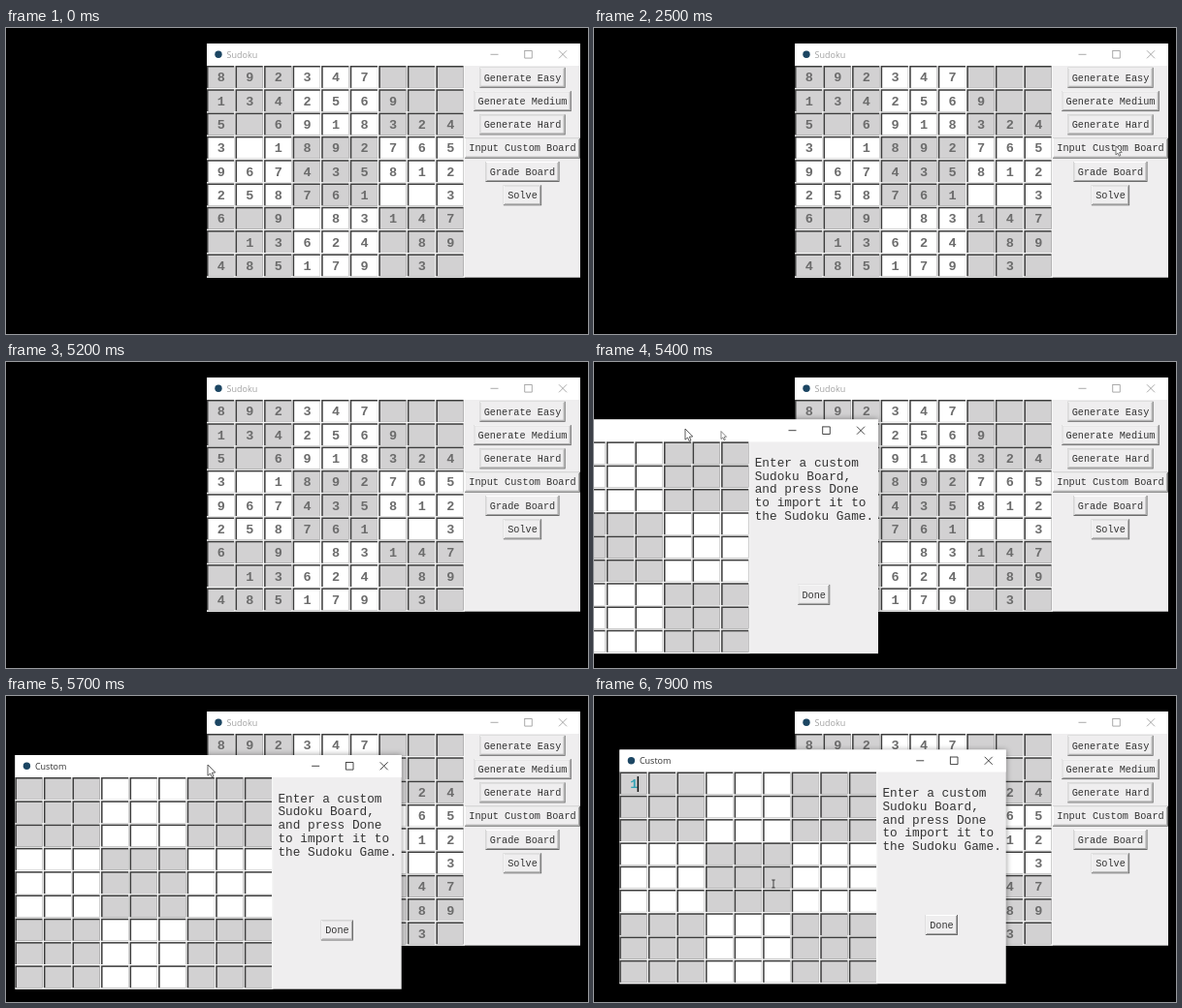
An HTML page with a canvas that plays this animation: 600 px wide and 316 px high, repeating every 8 s.

```html
<!DOCTYPE html>
<html lang="en">
<head>
<meta charset="utf-8">
<title>Sudoku</title>
<style>
  html, body { margin: 0; width: 100%; height: 100%; overflow: hidden; background: #000; }
  canvas { display: block; }
</style>
</head>
<body>
<canvas id="stage" width="600" height="316"></canvas>
<script>
const ctx = document.getElementById('stage').getContext('2d');
const LOOP = 8000, STEP = 100;
const MONO = '"Liberation Mono", monospace';
const SANS = '"Open Sans", sans-serif';
const INK = '#333';
const TITLE_H = 23, GRID_W = 266, GRID_H = 218.7;
const CELL_W = GRID_W / 9, CELL_H = GRID_H / 9;
const WINDOW_H = TITLE_H + GRID_H;
const MAIN = { x: 207, y: 16, w: 385 };
const CUSTOM_W = 398.3;

const BOARD = [
  '892347   ', '1342569  ', '5 6918324',
  '3 1892765', '967435812', '258761  3',
  '6 9 83147', ' 13624 89', '485179 3 ',
];
const BUTTONS = ['Generate Easy', 'Generate Medium', 'Generate Hard',
  'Input Custom Board', 'Grade Board', 'Solve'];
const HINT = ['Enter a custom', 'Sudoku Board,', 'and press Done',
  'to import it to', 'the Sudoku Game.'];

// Key points: [time, x, y]
const APPROACH = [[100, 224, 240], [900, 541, 50], [1400, 517, 120], [1800, 578, 190],
  [2100, 578, 188], [2500, 538, 122], [2900, 538, 122], [3400, 251, 238],
  [4100, 251, 238], [4700, 202, 140]];
const DRAG = [[5400, 94, 69], [5700, 208, 71], [5900, 225, 65.5], [6000, 225, 65.5],
  [6200, 173.5, 79], [6600, 20, 101], [6900, 41, 95], [7300, 41, 95], [7800, 185, 194]];
const CUSTOM_PATH = [[5400, -105.3, 59.4], [5700, 9.4, 61], [5900, 26.4, 55.5]];

function along(path, t) {
  if (t <= path[0][0]) return path[0].slice(1);
  for (let i = 1; i < path.length; i++) {
    const [t0, x0, y0] = path[i - 1], [t1, x1, y1] = path[i];
    if (t <= t1) {
      const k = (t - t0) / (t1 - t0);
      return [x0 + (x1 - x0) * k, y0 + (y1 - y0) * k];
    }
  }
  return path[path.length - 1].slice(1);
}

function rect(x, y, w, h, color) {
  ctx.fillStyle = color;
  ctx.fillRect(x, y, w, h);
}

function text(str, x, y, font, color, align = 'left') {
  ctx.font = font;
  ctx.fillStyle = color;
  ctx.textAlign = align;
  ctx.fillText(str, x, y);
}

function lines(color, width, ...paths) {
  ctx.strokeStyle = color;
  ctx.lineWidth = width;
  ctx.beginPath();
  for (const p of paths) {
    ctx.moveTo(p[0], p[1]);
    for (let i = 2; i < p.length; i += 2) ctx.lineTo(p[i], p[i + 1]);
  }
  ctx.stroke();
}

function windowFrame(x, y, w, title, active) {
  ctx.shadowColor = 'rgba(0,0,0,.4)';
  ctx.shadowBlur = 6;
  rect(x, y, w, WINDOW_H, '#efeeef');
  ctx.shadowColor = 'transparent';
  rect(x, y, w, TITLE_H, '#fff');
  const mid = y + 11.3, right = x + w;
  ctx.fillStyle = '#1c4663';
  ctx.beginPath();
  ctx.arc(x + 12, mid, 3.7, 0, Math.PI * 2);
  ctx.fill();
  const color = active ? INK : '#a2a2a2';
  text(title, x + 20.5, y + 14.8, '9px ' + SANS, color);
  lines(color, 0.9,
    [right - 92.5, mid, right - 84.5, mid],
    [right - 57.3, mid - 3.8, right - 49.7, mid - 3.8, right - 49.7, mid + 3.8,
      right - 57.3, mid + 3.8, right - 57.3, mid - 4.2],
    [right - 22, mid - 4, right - 14, mid + 4],
    [right - 14, mid - 4, right - 22, mid + 4]);
}

function grid(x, y, digitAt, color) {
  for (let r = 0; r < 9; r++) for (let c = 0; c < 9; c++) {
    const cx = x + c * CELL_W, cy = y + r * CELL_H;
    const shaded = (Math.floor(r / 3) + Math.floor(c / 3)) % 2 === 0;
    rect(cx, cy, CELL_W, CELL_H, '#f6f6f6');
    rect(cx, cy, CELL_W - 1.4, CELL_H - 1.4, '#3c3c3c');
    rect(cx + 1.5, cy + 1.5, CELL_W - 2.9, CELL_H - 2.9, shaded ? '#d2d1d2' : '#fff');
    text(digitAt(r, c), cx + 14.8, cy + 16.4, 'bold 13.5px ' + MONO, color, 'center');
  }
}

function button(label, cx, cy, pressed) {
  const w = label.length * 6.13 + 8.6, h = 21, x = cx - w / 2, y = cy - h / 2;
  const [light, dark] = pressed ? ['#6b6b6b', '#fff'] : ['#fff', '#6b6b6b'];
  rect(x, y, w, h, dark);
  rect(x, y, w - 1, h - 1, light);
  rect(x + 1, y + 1, w - 2, h - 2, pressed ? '#efeeef' : '#a6a6a6');
  rect(x + 1, y + 1, w - 3, h - 3, '#efeeef');
  text(label, cx, cy + 3.2, '10.22px ' + MONO, INK, 'center');
}

function mainWindow(t) {
  const { x, y, w } = MAIN;
  windowFrame(x, y, w, 'Sudoku', t >= 2800 && t < 5100);
  grid(x, y + TITLE_H, (r, c) => BOARD[r][c], '#6c6c6c');
  BUTTONS.forEach((label, i) =>
    button(label, 532.5, 51.3 + i * CELL_H, i === 3 && t >= 2800 && t < 3000));
}

function customWindow(x, y, t) {
  const typed = t >= 7500;
  windowFrame(x, y, CUSTOM_W, 'Custom', true);
  grid(x, y + TITLE_H, (r, c) => typed && r + c === 0 ? '1' : '', '#36a3b5');
  if (t >= 6900) rect(x + (typed ? 18.2 : 14), y + 27.5, 1.5, 16, '#111');
  HINT.forEach((line, i) =>
    text(line, x + 271, y + 48.5 + i * 13.75, '12.76px ' + MONO, INK));
  button('Done', x + 332, y + 181);
}

function arrow(x, y, size = 1) {
  ctx.save();
  ctx.translate(x, y);
  ctx.scale(size, size);
  ctx.beginPath();
  [[0, 0], [0, 9], [2, 7.2], [3.4, 10.2], [4.8, 9.6], [3.5, 6.6], [6.2, 6.4]]
    .forEach(p => ctx.lineTo(...p));
  ctx.closePath();
  ctx.fillStyle = '#fff';
  ctx.fill();
  ctx.strokeStyle = '#444';
  ctx.lineWidth = 0.7;
  ctx.stroke();
  ctx.restore();
}

function iBeam(x, y) {
  lines(INK, 0.9, [x, y - 4, x, y + 4],
    [x - 1.7, y - 4, x + 1.7, y - 4], [x - 1.7, y + 4, x + 1.7, y + 4]);
}

function pointer(x, y, gridX, gridY) {
  const overGrid = x >= gridX && x < gridX + GRID_W && y >= gridY;
  (overGrid ? iBeam : arrow)(x, y);
}

function draw(t) {
  rect(0, 0, 600, 316, '#000');
  mainWindow(t);
  if (t >= 100 && t < 4800) {
    pointer(...along(APPROACH, t), MAIN.x, MAIN.y + TITLE_H);
  }
  if (t >= 5400) {
    const [x, y] = along(CUSTOM_PATH, t);
    customWindow(x, y, t);
    const [px, py] = along(DRAG, t);
    if (t < 6000) arrow(px, py, 1.25);
    else pointer(px, py, x, y + TITLE_H);
    if (t < 5500) arrow(131, 71.5, 0.9);
  }
}

const start = performance.now();
function frame() {
  const t = (performance.now() - start) % LOOP;
  draw(Math.floor(t / STEP) * STEP);
  requestAnimationFrame(frame);
}
frame();
</script>
</body>
</html>
```
